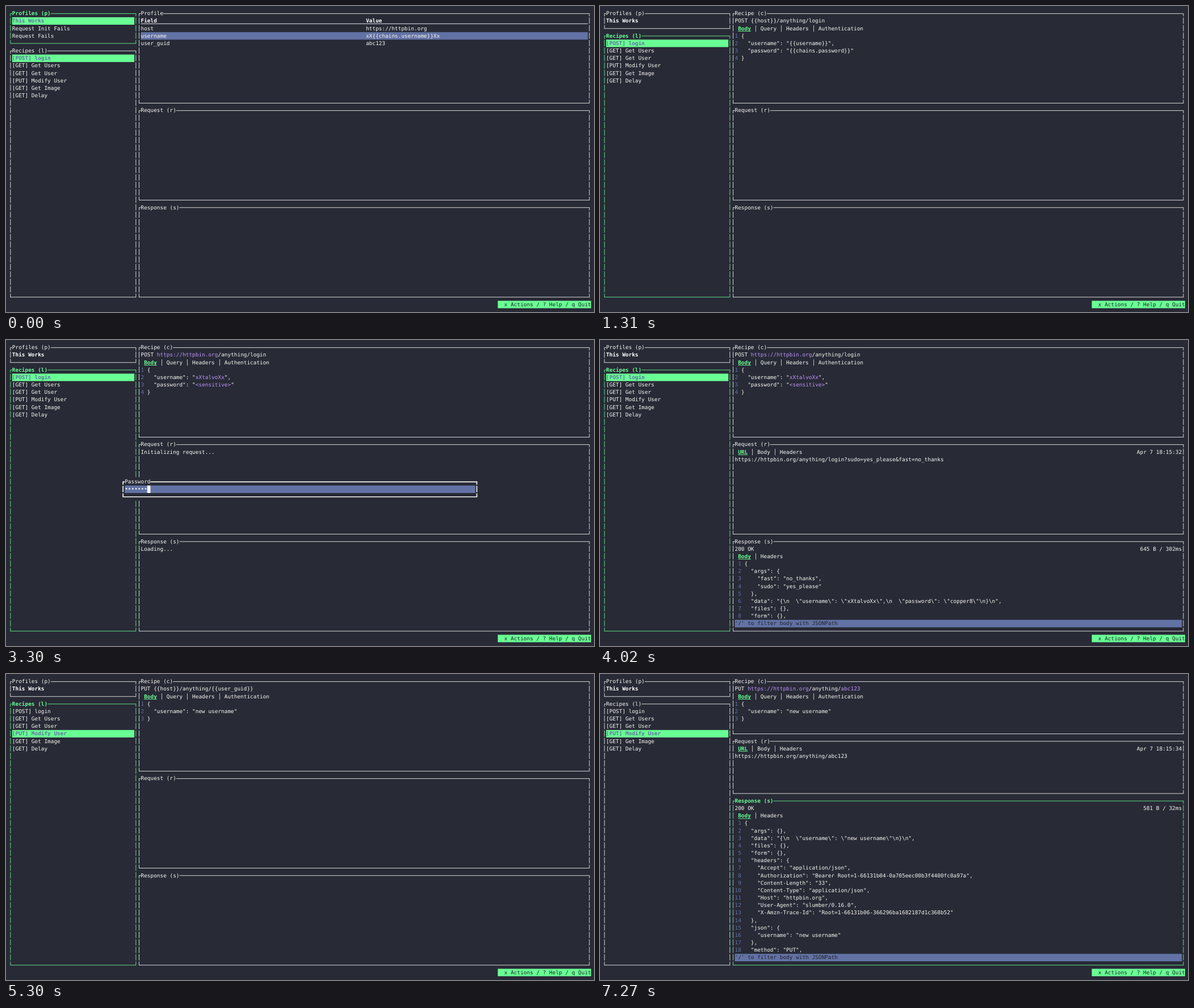
Recreate the animation shown at these times as an HTML page. Size 1036 by 540 pixels, loop 8 s.

```html
<!DOCTYPE html>
<html lang="en">
<head>
<meta charset="utf-8">
<title>Terminal HTTP client</title>
<style>
  html, body { margin: 0; width: 100%; height: 100%; overflow: hidden; background: #282a36; }
  #term {
    display: block; width: 1036px; height: 540px; background: #282a36;
    font: 9.412px "DejaVu Sans Mono", monospace;
    text-rendering: geometricPrecision; font-variant-ligatures: none;
  }
  text { white-space: pre; fill: #f8f8f2; }
  path { fill: none; stroke: #f8f8f2; }
  path.focus { stroke: #69ff94; }
  text.bold { font-weight: bold; fill: #fff; }
  text.title { font-weight: bold; fill: #69ff94; }
  text.pick { font-weight: bold; fill: #6272a4; }
  text.dark { fill: #21222c; }
  text.value { fill: #bd93f9; }
  text.num { fill: #6272a4; }
</style>
</head>
<body>
<svg id="term" viewBox="0 0 1036 540"></svg>
<script>
const LOOP = 8000;
const COLS = 181, ROWS = 40;
const CELL = 17 / 3, ROW = 79 / 6;
const LEFT = (1036 - COLS * CELL) / 2, TOP = (540 - ROWS * ROW) / 2;
const BASE = 9.6, MID_X = 2.7, MID_Y = 6.75, BAR_TOP = 0.7, BAR_END = 11.6;
const MAIN = 41, END = 180, WIDTH = END - MAIN;
const BACK = '#282a36', SLATE = '#6272a4', GREEN = '#69ff94', WHITE = '#f8f8f2';

const KEYS = [0, 1, 2, 3, 4, 5].map(i => 2740 + 84 * i).concat(3300);
const CUTS = [0, 490, 1310, 1500, 1700, 1750, ...KEYS, 3460, 3500, 3760, 4020,
  4970, 5010, 5120, 5260, 5300, 5510, 5950, 6020, 7270];

const HOST = 'https://httpbin.org';
const USER = 'talvo';
const FIELDS = [['host', HOST], ['username', ''], ['user_guid', 'abc123']];

// Text between ~ marks is a rendered template value.
const RECIPES = [
  { name: '[POST] login', from: 0, ready: 1500,
    raw: 'POST {{host}}/anything/login', url: `POST ~${HOST}~/anything/login` },
  { name: '[GET] Get Users', from: 4970, ready: 5010,
    raw: 'GET {{host}}/get', url: `GET ~${HOST}~/get` },
  { name: '[GET] Get User', from: 5120, ready: 5260,
    raw: 'GET {{host}}/anything/{{user_guid}}', url: `GET ~${HOST}~/anything/~abc123~` },
  { name: '[PUT] Modify User', from: 5300, ready: 5510,
    raw: 'PUT {{host}}/anything/{{user_guid}}', url: `PUT ~${HOST}~/anything/~abc123~` },
  { name: '[GET] Get Image', from: Infinity },
  { name: '[GET] Delay', from: Infinity }
];

const LOGIN_REPLY = String.raw`{
  "args": {
    "fast": "no_thanks",
    "sudo": "yes_please"
  },
  "data": "{\n  \"username\": \"xX${USER}Xx\",\n  \"password\": \"copper8\"\n}\n",
  "files": {},
  "form": {},`.split('\n');

const MODIFY_REPLY = String.raw`{
  "args": {},
  "data": "{\n  \"username\": \"new username\"\n}\n",
  "files": {},
  "form": {},
  "headers": {
    "Accept": "application/json",
    "Authorization": "Bearer Root=1-66131b04-0a705eec00b3f4400fc0a97a",
    "Content-Length": "33",
    "Content-Type": "application/json",
    "Host": "httpbin.org",
    "User-Agent": "slumber/0.16.0",
    "X-Amzn-Trace-Id": "Root=1-66131b06-366296ba1682187d1c368b52"
  },
  "json": {
    "username": "new username"
  },
  "method": "PUT",`.split('\n');

const term = document.getElementById('term');
const colX = col => LEFT + col * CELL;
const rowY = row => TOP + row * ROW;

function add(tag, attrs, text = '') {
  const el = document.createElementNS('http://www.w3.org/2000/svg', tag);
  for (const name in attrs) el.setAttribute(name, attrs[name]);
  el.textContent = text;
  term.append(el);
}

function put(row, col, text, style = '') {
  add('text', { x: colX(col), y: rowY(row) + BASE, class: style }, text);
}

function fill(row, col, cols, color, rows = 1) {
  add('rect', { x: colX(col), y: rowY(row), width: cols * CELL, height: rows * ROW, fill: color });
}

function underline(row, col, cols, color) {
  add('rect', { x: colX(col), y: rowY(row) + 11, width: cols * CELL, height: 0.9, fill: color });
}

const putRight = (row, text) => put(row, END - text.length, text);

function rich(row, col, text) {
  text.split('~').forEach((part, i) => {
    if (part) put(row, col, part, i % 2 ? 'value' : '');
    col += part.length;
  });
}

// The upright sides are one short bar per row, as in a terminal font.
function frame(top, bottom, left, right, title, weight, style = '') {
  const x0 = colX(left) + MID_X, x1 = colX(right) + MID_X;
  const y0 = rowY(top) + MID_Y, y1 = rowY(bottom) + MID_Y;
  let d = `M${x0} ${y0}H${colX(left + 1)}M${colX(left + 1 + title.length)} ${y0}H${x1}M${x0} ${y1}H${x1}`;
  for (let r = top; r <= bottom; r++) {
    const from = r === top ? y0 - weight / 2 : rowY(r) + BAR_TOP;
    const to = r === bottom ? y1 + weight / 2 : rowY(r) + BAR_END;
    for (const x of [x0, x1]) d += `M${x} ${from}V${to}`;
  }
  add('path', { d, class: style, 'stroke-width': weight });
}

function pane(top, bottom, left, right, title, focused) {
  frame(top, bottom, left, right, title, 0.85, focused ? 'focus' : '');
  put(top, left + 1, title, focused ? 'title' : '');
}

function tabs(row, names) {
  const first = names[0], col = MAIN + 1;
  put(row, col, first, 'title');
  underline(row, col, first.length, GREEN);
  put(row, col + first.length, names.slice(1).map(n => ' │ ' + n).join(''));
}

function code(row, lines, digits) {
  lines.forEach((text, i) => {
    put(row + i, MAIN, String(i + 1).padStart(digits), 'num');
    rich(row + i, MAIN + digits + 1, text);
  });
}

function picked(row, text) {
  fill(row, 1, 38, GREEN);
  put(row, 1, text, 'pick');
}

function sidebar(t, chosen) {
  const start = t < 1310;
  const split = start ? 5 : 3;
  pane(0, split - 1, 0, 39, 'Profiles (p)', start);
  if (start) {
    picked(1, 'This Works');
    put(2, 1, 'Request Init Fails');
    put(3, 1, 'Request Fails');
  } else {
    put(1, 1, 'This Works', 'bold');
  }
  pane(split, 38, 0, 39, 'Recipes (l)', !start && t < 7270);
  RECIPES.forEach((r, i) => (i === chosen ? picked(split + 1 + i, r.name) : put(split + 1 + i, 1, r.name)));
}

function profile(t) {
  const valueCol = MAIN + 70;
  put(1, MAIN, 'Field', 'bold');
  put(1, valueCol, 'Value', 'bold');
  underline(1, MAIN, WIDTH, '#fff');
  fill(3, MAIN, WIDTH, SLATE);
  FIELDS.forEach(([name, value], i) => {
    put(2 + i, MAIN, name);
    rich(2 + i, valueCol, value || (t < 490 ? 'xX{{chains.username}}Xx' : `xX~${USER}~Xx`));
  });
}

function recipe(t, chosen) {
  const r = RECIPES[chosen];
  rich(1, MAIN, t < r.ready ? r.raw : r.url);
  tabs(2, ['Body', 'Query', 'Headers', 'Authentication']);
  if (chosen === 0) {
    const [user, pass] = t < 1750
      ? ['{{username}}', '{{chains.password}}']
      : [`~xX${USER}Xx~`, '~<sensitive>~'];
    code(3, ['{', `  "username": "${user}",`, `  "password": "${pass}"`, '}'], 1);
  } else if (chosen === 3) {
    code(3, ['{', '  "username": "new username"', '}'], 1);
  }
}

function request(row, path, time) {
  tabs(row + 1, ['URL', 'Body', 'Headers']);
  putRight(row + 1, time);
  put(row + 2, MAIN, HOST + path);
}

function response(row, stats, lines) {
  put(row + 1, MAIN, '200 OK');
  putRight(row + 1, stats);
  tabs(row + 2, ['Body', 'Headers']);
  code(row + 3, lines.slice(0, 34 - row), 2);
  fill(37, MAIN, WIDTH, SLATE);
  put(37, MAIN, "'/' to filter body with JSONPath", 'dark');
}

function exchange(t, req, res) {
  const starting = (t >= 1700 && t < 3500) || (t >= 5950 && t < 6020);
  if (starting) {
    put(req + 1, MAIN, 'Initializing request...');
    put(res + 1, MAIN, 'Loading...');
  } else if (t >= 3500 && t < 4970) {
    request(req, '/anything/login?sudo=yes_please&fast=no_thanks', 'Apr 7 18:15:32');
    if (t < 4020) {
      put(res + 1, MAIN, 'Loading...');
      putRight(res + 1, t < 3760 ? '1ms' : '255ms');
    } else {
      response(res, '645 B / 302ms', LOGIN_REPLY);
    }
  } else if (t >= 6020) {
    request(req, '/anything/abc123', 'Apr 7 18:15:34');
    response(res, '581 B / 32ms', MODIFY_REPLY);
  }
}

function prompt(t) {
  const typed = KEYS.filter(k => k <= t).length;
  const title = 'Password';
  fill(18, 35, 111, BACK, 3);
  frame(18, 20, 35, 145, title, 1.7);
  put(18, 36, title);
  fill(19, 36, 109, SLATE);
  put(19, 36, '•'.repeat(typed));
  fill(19, 36 + typed, 1, WHITE);
}

function draw(t) {
  const chosen = RECIPES.filter(r => r.from <= t).length - 1;
  const wide = t >= 7270;
  const req = wide ? 8 : 13, res = wide ? 16 : 26;
  term.textContent = '';
  sidebar(t, chosen);
  pane(0, req - 1, 40, END, t < 1310 ? 'Profile' : 'Recipe (c)', false);
  pane(req, res - 1, 40, END, 'Request (r)', false);
  pane(res, 38, 40, END, 'Response (s)', wide);
  if (t < 1310) profile(t);
  else recipe(t, chosen);
  exchange(t, req, res);
  if (t >= 1750 && t < 3460) prompt(t);
  fill(39, 152, 29, GREEN);
  put(39, 154, 'x Actions / ? Help / q Quit', 'dark');
}

let shown = -1;
const begin = performance.now();
function tick() {
  const t = (performance.now() - begin) % LOOP;
  const cut = CUTS.filter(c => c <= t).pop();
  if (cut !== shown) draw(shown = cut);
  requestAnimationFrame(tick);
}
tick();
</script>
</body>
</html>
```
